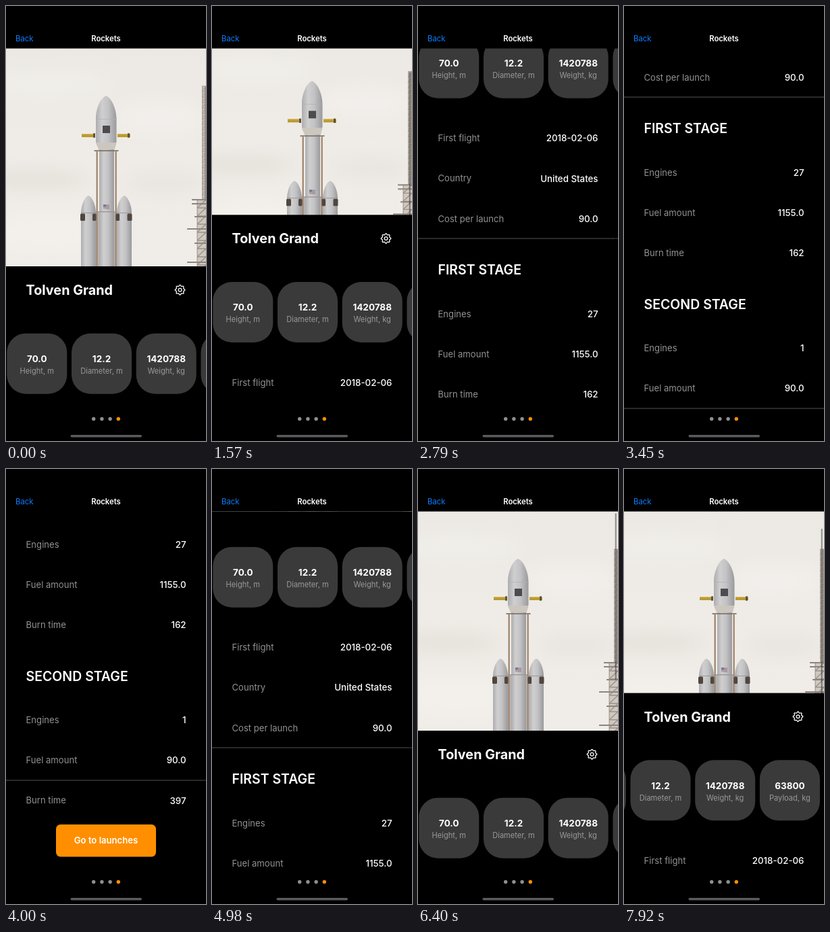
Write an HTML page that moves like this. It is 296 px wide and 640 px high and loops after 8000 ms.

```html
<!DOCTYPE html>
<html lang="en">
<head>
<meta charset="utf-8">
<title>Rockets</title>
<style>
html, body { margin: 0; width: 100%; height: 100%; overflow: hidden; background: #000; }
svg { display: block; width: 100vw; height: 100vh; }
text { font-family: Inter, "Liberation Sans", sans-serif; fill: #fff; white-space: pre; }
</style>
</head>
<body>
<svg id="stage" viewBox="0 0 296 640">
  <defs>
    <clipPath id="view"><rect y="62.6" width="296" height="537.4"/></clipPath>
    <linearGradient id="sky" x2="0" y2="1">
      <stop offset="0" stop-color="#ece9e4"/>
      <stop offset=".45" stop-color="#efece7"/>
      <stop offset="1" stop-color="#f0ede8"/>
    </linearGradient>
    <linearGradient id="hull">
      <stop offset="0" stop-color="#adadaf"/>
      <stop offset=".3" stop-color="#cfcfd0"/>
      <stop offset=".6" stop-color="#c3c3c5"/>
      <stop offset="1" stop-color="#9a9a9d"/>
    </linearGradient>
    <filter id="soft" x="-50%" y="-100%" width="200%" height="300%"><feGaussianBlur stdDeviation="12"/></filter>
  </defs>
  <rect width="296" height="640"/>
  <g clip-path="url(#view)">
    <g id="photo"></g>
    <g id="page"></g>
    <rect id="bar" x="291.7" width="2.1" height="245" rx="1" fill="#000" fill-opacity=".4"/>
  </g>
  <g id="chrome"></g>
</svg>
<script>
const $ = id => document.getElementById(id);

function add(parent, tag, attrs, content) {
  const node = document.createElementNS('http://www.w3.org/2000/svg', tag);
  for (const key in attrs) node.setAttribute(key, attrs[key]);
  if (content) node.textContent = content;
  parent.appendChild(node);
  return node;
}

const rect = (parent, x, y, width, height, fill, rx = 0) =>
  add(parent, 'rect', { x, y, width, height, fill, rx });

const path = (parent, d, fill, stroke = 'none', width = 1) =>
  add(parent, 'path', { d, fill, stroke, 'stroke-width': width });

// y is the middle of the capital letters
function label(parent, x, y, size, weight, content, anchor = 'start', fill = '#fff') {
  add(parent, 'text', {
    x, y: y + size * 0.364, 'font-size': size, 'font-weight': weight,
    'text-anchor': anchor, style: `fill:${fill}`
  }, content);
}

const GREY = '#919193', ORANGE = '#ff8f00';

function drawTower(g) {
  rect(g, 290.5, 118, 5.5, 285, '#cbc3bc');
  rect(g, 290.2, 118, 1.1, 285, '#9d948d');
  rect(g, 294, 118, 1.6, 285, '#8b827c');
  for (let y = 118; y < 400; y += 8)
    path(g, `M290 ${y}H296L290 ${y + 8}`, 'none', '#a0978f', 1);
  rect(g, 283, 285, 13, 118, '#cfc8c1');
  rect(g, 282.5, 285, 1.2, 118, '#a0978f');
  for (let y = 285; y < 400; y += 12)
    path(g, `M283 ${y}H296L283 ${y + 12}`, 'none', '#9b918a', 1.3);
  for (const [x, y] of [[275, 284], [275, 290], [279, 309], [268, 327], [279, 348], [268, 376]])
    rect(g, x, y, 296 - x, 2, '#8f857e');
}

function drawPhoto(g) {
  rect(g, 0, 62, 296, 350, 'url(#sky)');
  const clouds = [[60, 115, 90, 16, '#f1efea'], [225, 165, 70, 22, '#f2efeb'],
    [40, 255, 85, 14, '#e5e2dc'], [60, 335, 100, 30, '#f3f0eb'], [235, 260, 60, 18, '#e9e6e1']];
  for (const [cx, cy, rx, ry, fill] of clouds)
    add(g, 'ellipse', { cx, cy, rx, ry, fill, filter: 'url(#soft)' });
  drawTower(g);

  // support rods and arms
  rect(g, 133, 302, 31, 106, '#b5b2b1');
  for (const x of [133.6, 161.6]) {
    rect(g, x, 214, 2.4, 190, '#b59a82');
    rect(g, x + 0.3, 214, 0.8, 190, '#8c7260');
  }
  for (const [x, end] of [[112, 130], [165, 181]]) {
    rect(g, x, 188, 19, 5, '#b99b32');
    rect(g, x, 188, 19, 1.2, '#d3b44b');
    rect(g, end - 1, 187.3, 3, 6.4, '#5e5139');
  }

  // core
  rect(g, 138, 208, 22, 200, 'url(#hull)');
  path(g, 'M148 132C140 135 133 151 133 166V198C133 204 136 206 137 211H161C161 206 163.5 204 163.5 198V166C163.5 151 156 135 148 132Z', 'url(#hull)');
  path(g, 'M133.5 201C134.5 205 136.3 207 137 211H161C161.5 207 162.5 205 163 201Z', '#cbc7bf');
  rect(g, 133, 166, 30.5, 0.7, '#b0b0b2');
  rect(g, 143, 176, 11, 11, '#4d4b50');
  rect(g, 130.5, 212, 36, 1.8, '#85786d');

  // side boosters
  for (const x of [122, 175]) {
    path(g, `M${x} 279C${x - 6} 281 ${x - 11} 294 ${x - 11} 304V408H${x + 11}V304C${x + 11} 294 ${x + 6} 281 ${x} 279Z`, 'url(#hull)');
    rect(g, x - 11, 304, 22, 0.8, '#8e8e92');
  }
  for (const [x, w] of [[110, 7], [128, 5.5], [162.5, 5.5], [179.5, 7]])
    rect(g, x, 305.5, w, 10.5, '#51463f', 1.5);
  rect(g, 133, 302, 31, 1.4, '#9c9694');
  rect(g, 144, 292, 9, 6.5, '#a8a2ab');
  rect(g, 144, 292, 4, 3.4, '#777b91');
  for (const y of [293, 295.5, 298]) rect(g, 148, y, 5, 0.8, '#b48685');
}

function gear(g, cx, cy) {
  let d = '';
  for (let i = 0; i < 32; i++) {
    const r = i % 4 < 2 ? 7.2 : 5.7;
    const a = (i - 0.5) * Math.PI / 16;
    d += `${i ? 'L' : 'M'}${(cx + r * Math.sin(a)).toFixed(2)} ${(cy - r * Math.cos(a)).toFixed(2)}`;
  }
  path(g, d + 'Z', 'none', '#fff', 1.25).setAttribute('stroke-linejoin', 'round');
  add(g, 'circle', { cx, cy, r: 2.4, fill: 'none', stroke: '#fff', 'stroke-width': 1.25 });
}

function drawPage(g) {
  rect(g, 0, 383, 296, 1200, '#000');
  label(g, 29.5, 418, 19.8, 700, 'Tolven Grand');
  gear(g, 257.5, 417.7);

  const cards = add(g, 'g', {});
  [['70.0', 'Height, m'], ['12.2', 'Diameter, m'], ['1420788', 'Weight, kg'], ['63800', 'Payload, kg']]
    .forEach(([value, name], i) => {
      const x = 1.3 + i * 95.7;
      rect(cards, x, 481.7, 89, 89, '#3a3a3a', 28);
      label(cards, x + 44.5, 519.3, 13.5, 700, value, 'middle');
      label(cards, x + 44.5, 537, 11.1, 400, name, 'middle', '#999');
    });

  const rows = (top, list) => list.forEach(([name, value], i) => {
    label(g, 29.5, top + i * 59.2, 13.1, 400, name, 'start', GREY);
    label(g, 266.5, top + i * 59.2, 13.3, 500, value, 'end');
  });
  rows(629.5, [['First flight', '2018-02-06'], ['Country', 'United States'], ['Cost per launch', '90.0']]);
  label(g, 29.5, 823.3, 19.5, 600, 'FIRST STAGE');
  rows(888, [['Engines', '27'], ['Fuel amount', '1155.0'], ['Burn time', '162']]);
  label(g, 29.5, 1082, 19.5, 600, 'SECOND STAGE');
  rows(1146.3, [['Engines', '1'], ['Fuel amount', '90.0'], ['Burn time', '397']]);
  for (const y of [776.6, 1234.6]) rect(g, 0, y, 296, 0.9, '#5c5c5e');
  rect(g, 74, 1300, 148, 47.4, ORANGE, 6.5);
  label(g, 148, 1323.7, 13.1, 600, 'Go to launches', 'middle');
  return cards;
}

function drawChrome(g) {
  label(g, 14, 48, 11.4, 400, 'Back', 'start', '#0a7dff');
  label(g, 148, 48, 11.3, 600, 'Rockets', 'middle');
  for (let i = 0; i < 4; i++)
    add(g, 'circle', { cx: 129.7 + i * 12.2, cy: 607.5, r: 2.7, fill: i < 3 ? '#8e8e8e' : ORANGE });
  rect(g, 95.5, 631, 105.5, 3.5, '#5b5b5d', 1.75);
}

drawPhoto($('photo'));
const cards = drawPage($('page'));
drawChrome($('chrome'));

// Each swipe: start, end, steps, final offset, ease-out power
const SCROLL = [
  [1460, 2170, 8, 216, 1.5], [2270, 2790, 6, 435, 1.6],
  [3010, 3780, 8, 705, 1.5], [3900, 4000, 2, 777, 1],
  [4160, 4860, 8, 430, 1.5], [4980, 5580, 7, 125, 1.5], [5680, 5780, 2, 110, 1.4],
  [5880, 6080, 3, -12, 2], [6190, 6400, 3, -2, 1.5], [6500, 6600, 2, 0, 1],
  [7700, 7920, 3, 53.4, 5]
];
const SLIDE = [[6840, 7040, 3, 87.5, 1.5]];
const FADE = [[1460, 1470, 1, 1, 1], [6840, 7040, 3, 0, 1], [7700, 7710, 1, 1, 1]];
const LOOP = 8000, OVERLAP = 54;

function track(swipes, t) {
  let pos = 0;
  for (const [start, end, steps, to, power] of swipes) {
    if (t < start) break;
    const step = Math.floor((t - start) / (end - start) * (steps - 1) + 1e-6) + 1;
    const p = Math.min(1, step / steps);
    pos += (to - pos) * (1 - (1 - p) ** power);
  }
  return pos;
}

const move = (node, x, y) => node.setAttribute('transform', `translate(${x} ${y})`);

function render(t) {
  const y = track(SCROLL, t);
  move($('photo'), 0, -Math.max(0, y - OVERLAP));
  move($('page'), 0, -y);
  move(cards, -track(SLIDE, t), 0);
  $('bar').setAttribute('y', 65 + Math.max(0, y) * 0.425);
  $('bar').setAttribute('opacity', track(FADE, t));
}

const begin = performance.now();
function tick() {
  render((performance.now() - begin) % LOOP);
  requestAnimationFrame(tick);
}
render(0);
requestAnimationFrame(tick);
</script>
</body>
</html>
```
